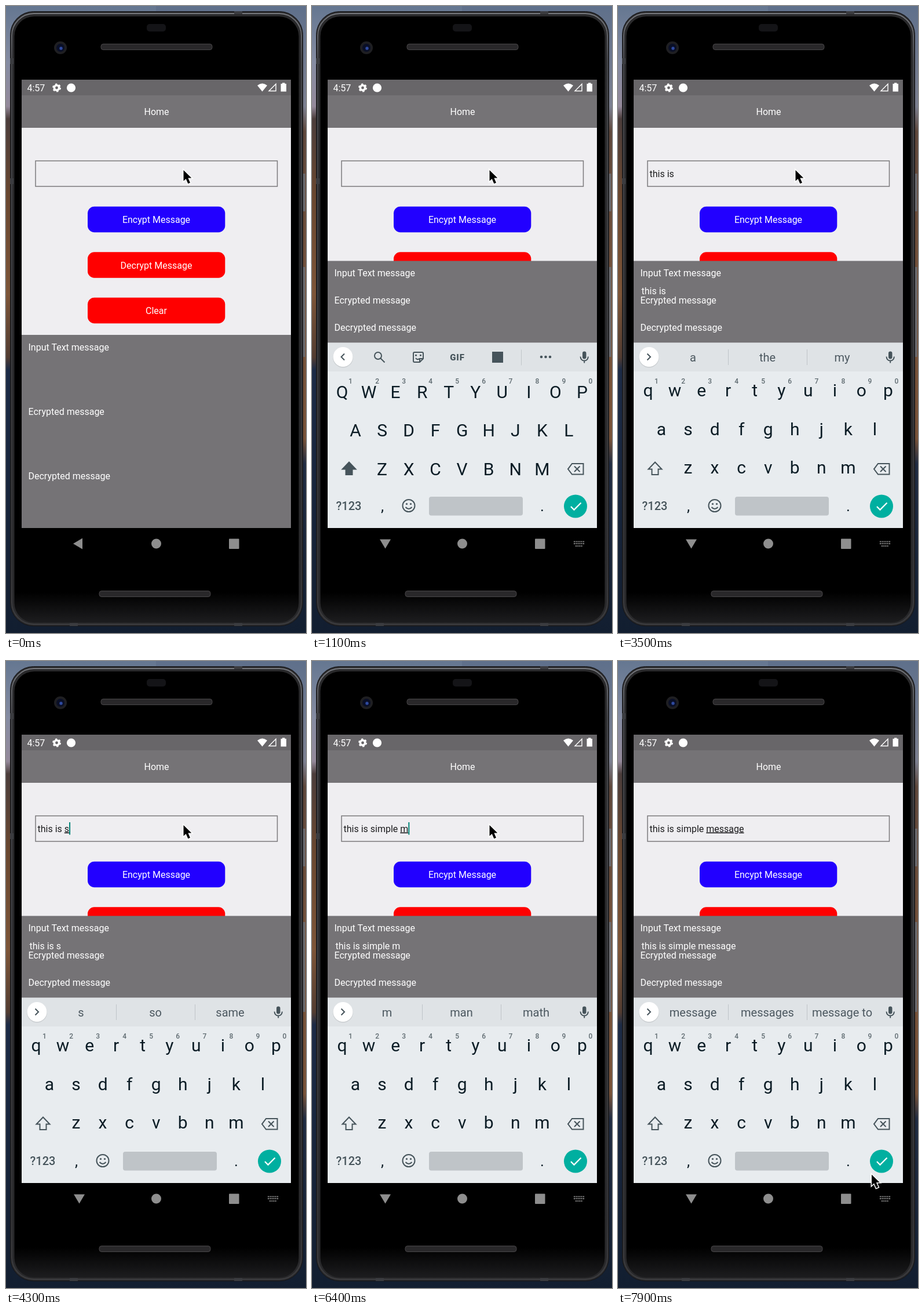
An HTML page for the animation above (8000 ms loop, 518 px wide and 1081 px high).

```html
<!DOCTYPE html>
<html lang="en">
<head>
<meta charset="utf-8">
<title>Message app</title>
<style>
html, body { margin: 0; width: 100%; height: 100%; overflow: hidden; background: #000; }
svg { display: block; width: 100vw; height: 100vh; }
text { font: 16px Roboto, sans-serif; white-space: pre; }
.mid { text-anchor: middle; }
.white { fill: #fff; }
.line { fill: none; stroke: #46545b; stroke-width: 2; }
.ink { fill: #46545b; }
.key { font-size: 30px; fill: #0b1c25; }
.hint { font-size: 12px; font-weight: 500; fill: #5e6a70; }
.word { font-size: 20px; fill: #4c5860; }
.composing { text-decoration: underline; }
</style>
</head>
<body>
<svg viewBox="0 0 518 1081" preserveAspectRatio="none">
  <defs>
    <linearGradient id="leftView" x2="0" y2="1">
      <stop offset="0" stop-color="#657791"/><stop offset=".09" stop-color="#858ca2"/>
      <stop offset=".16" stop-color="#94899a"/><stop offset=".18" stop-color="#4b3d3b"/>
      <stop offset=".3" stop-color="#694730"/><stop offset=".46" stop-color="#7d5538"/>
      <stop offset=".56" stop-color="#523c31"/><stop offset=".58" stop-color="#1c2b46"/>
      <stop offset="1" stop-color="#121e30"/>
    </linearGradient>
    <linearGradient id="rightView" x2="0" y2="1">
      <stop offset="0" stop-color="#5f708b"/><stop offset=".16" stop-color="#7b7f90"/>
      <stop offset=".2" stop-color="#5e473b"/><stop offset=".45" stop-color="#74513a"/>
      <stop offset=".69" stop-color="#785238"/><stop offset=".73" stop-color="#202c42"/>
      <stop offset="1" stop-color="#121e30"/>
    </linearGradient>
    <linearGradient id="rim" x2="0" y2="1">
      <stop offset="0" stop-color="#77797e"/><stop offset=".08" stop-color="#45464a"/>
      <stop offset=".9" stop-color="#333336"/><stop offset="1" stop-color="#3d3d40"/>
    </linearGradient>
    <linearGradient id="glass" x2="0" y2="1">
      <stop offset=".95" stop-color="#000"/><stop offset="1" stop-color="#1d1d1f"/>
    </linearGradient>
    <clipPath id="kbClip"><rect id="kbArea" x="27" y="580.5" width="465" height="319.5"/></clipPath>
  </defs>

  <rect width="518" height="1081" fill="url(#leftView)"/>
  <rect x="259" width="259" height="1081" fill="url(#rightView)"/>

  <!-- phone -->
  <path d="M512 289h4.500v65h-4.500zM512 450h4.500v155h-4.500z" fill="#6b6c71"/>
  <rect x="7.500" y="9.500" width="505" height="1059.500" rx="40" fill="#29292b" stroke="#151517"/>
  <rect x="10" y="13" width="500" height="1053" rx="38" fill="none" stroke="url(#rim)" stroke-width="2"/>
  <rect x="14.500" y="18" width="491" height="1045" rx="34" fill="url(#glass)"/>
  <path d="M7 90h6v10H7zM7 297h6v10H7zM394 9h14v5h-14zM394 1064h14v5h-14zM110 1064h14v5h-14z" fill="#3b3c40"/>
  <rect x="243" y="31" width="33" height="13" rx="5" fill="#141417"/>
  <circle cx="94" cy="72" r="11" fill="#1f1f22"/>
  <circle cx="94" cy="72" r="7" fill="#0a0f26"/>
  <circle cx="95" cy="73" r="2.700" fill="#2f4aa0"/>
  <g fill="#29282a" stroke="#484648">
    <rect x="164" y="65.500" width="192" height="10" rx="4"/>
    <rect x="161" y="1008.500" width="192" height="10" rx="4"/>
  </g>

  <!-- app -->
  <rect x="27" y="127" width="465" height="27" fill="#686669"/>
  <rect x="27" y="154" width="465" height="56" fill="#757376"/>
  <rect x="27" y="210" width="465" height="370" fill="#efeef1"/>
  <g class="white">
    <text x="36.500" y="146.500">4:57</text>
    <circle cx="87.500" cy="141" r="4.200" fill="none" stroke="#fff" stroke-width="3.600"/>
    <circle cx="87.500" cy="141" r="6.400" fill="none" stroke="#fff" stroke-width="2" stroke-dasharray="3.350 3.350"/>
    <circle cx="112.500" cy="141" r="7.600"/>
    <path d="M442.500 147.500L434 137q8.500-7 17 0z"/>
    <path d="M466 134.500V146.500H454z" fill="none" stroke="#fff" stroke-width="1.400"/>
    <path d="M474.500 134h2.500v-1.500h4.500v1.500h2.500v13.500h-9.500z"/>
    <text class="mid" x="260" y="188">Home</text>
  </g>
  <rect x="51" y="267" width="417.500" height="44" fill="none" stroke="#7b797c" stroke-width="1.500"/>
  <text x="54.500" y="294.500" fill="#1c1c1e"><tspan id="typed"></tspan><tspan id="composing" class="composing"></tspan></text>
  <rect id="caret" y="278" width="2" height="21.500" fill="#008577"/>
  <g id="buttons"></g>
  <rect id="panel" x="27" width="465" fill="#757376"/>
  <g id="labels" class="white"></g>
  <text id="echo" class="white" x="40.500" y="497"></text>

  <!-- keyboard -->
  <rect id="sheet" x="27" y="580.500" width="465" height="373.500" fill="#f8f8fa"/>
  <g clip-path="url(#kbClip)"><g id="keyboard">
    <rect x="27" y="580.500" width="465" height="374" fill="#e8ecef"/>
    <rect x="27" y="580.500" width="465" height="49.500" fill="#dfe3e6"/>
    <circle cx="53.500" cy="606" r="17.500" fill="#c9cdd0"/>
    <circle cx="53.500" cy="605" r="17" fill="#fff"/>
    <path id="chevron" class="line"/>
    <g id="tools">
      <circle class="line" cx="114" cy="603" r="6"/>
      <path class="line" d="M118.500 607.500l7 7"/>
      <path class="line" d="M177 597h13q2 0 2 2v9l-6 6h-9q-2 0-2-2v-13q0-2 2-2zM186 614v-6h6M179 607q3 4 6 1"/>
      <path class="ink" d="M178 601h3v2.500h-3zM186 601h3v2.500h-3z"/>
      <text class="mid ink" x="251" y="610.500" style="font-size:15px;font-weight:900;letter-spacing:.8px">GIF</text>
      <rect class="ink" x="311" y="596" width="19" height="19"/>
      <path d="M361.500 592.500v27" stroke="#c1c6ca"/>
      <g class="ink"><circle cx="396" cy="605" r="2.300"/><circle cx="403.500" cy="605" r="2.300"/><circle cx="411" cy="605" r="2.300"/></g>
    </g>
    <g id="words">
      <path d="M190.500 592v27M326.500 592v27" stroke="#bfc4c8"/>
    </g>
    <rect class="ink" x="467" y="595.500" width="6.500" height="13" rx="3.200"/>
    <path class="line" d="M463.500 604.500q.5 7 6.700 7t6.700-7M470.200 611v4.500"/>
    <g id="keys"></g>
    <path id="shift" class="line" d="M64 786.500l11.500 12h-6v9.500h-11v-9.500h-6z"/>
    <path class="line" d="M449 789h19.500v18.500H449l-7-9.200zM453 793.500l9.500 9.500M462.500 793.500l-9.500 9.500"/>
    <text class="mid ink" x="63.500" y="869" style="font-size:20px;font-weight:500">?123</text>
    <text class="mid key" x="121.500" y="871" style="font-size:26px">,</text>
    <text class="mid key" x="397.500" y="871" style="font-size:26px">.</text>
    <circle class="line" cx="167" cy="861.500" r="10.500"/>
    <circle class="ink" cx="163.500" cy="858.500" r="1.600"/><circle class="ink" cx="170.500" cy="858.500" r="1.600"/>
    <path class="line" d="M161.500 864q5.500 6 11 0"/>
    <rect x="202" y="846" width="162" height="32.500" rx="4" fill="#bfc4c8"/>
    <circle cx="455" cy="862.500" r="20" fill="#00afa0"/>
    <path d="M447 863l5.500 5.500 12-12" fill="none" stroke="#fff" stroke-width="2.300"/>
  </g></g>

  <!-- navigation -->
  <rect id="shade" x="27" y="900" width="465" height="54"/>
  <g id="nav">
    <path id="back" d="M116 927l16-9.500v19z"/>
    <circle cx="259.500" cy="927" r="8.500"/>
    <rect x="385" y="918.500" width="17.500" height="17.500" rx="1"/>
    <path id="kbIcon" d="M452 923.500h18M452 927h18M455 931h12" stroke-width="2" stroke-dasharray="2 1.200"/>
  </g>
  <path id="pointer" d="M0 0v18.800l4.200-3.900 3.600 8.400 3.700-1.600-3.600-8.200h5.900z" stroke="#fff" stroke-width="3" paint-order="stroke"/>
</svg>
<script>
const LOOP = 8000, STEP = 100, FOCUS = 500, RESIZE = 800;
const $ = id => document.getElementById(id);

function add(parent, tag, attrs, text = '') {
  const el = document.createElementNS('http://www.w3.org/2000/svg', tag);
  for (const name in attrs) el.setAttribute(name, attrs[name]);
  el.textContent = text;
  return parent.appendChild(el);
}
const set = (id, attrs) => { for (const name in attrs) $(id).setAttribute(name, attrs[name]); };
const show = (id, on) => set(id, { visibility: on ? 'visible' : 'hidden' });
const progress = (t, from, to) => Math.min(1, Math.max(0, (t - from) / (to - from)));
const smooth = p => p * p * (3 - 2 * p);

['Encypt Message', 'Decrypt Message', 'Clear'].forEach((label, i) => {
  const y = 345.8 + i * 78.5;
  add($('buttons'), 'rect', { x: 141, y, width: 237.3, height: 44.4, rx: 11.5, fill: i ? '#f00' : '#20f' });
  add($('buttons'), 'text', { x: 259.5, y: y + 28.5, class: 'mid white' }, label);
});

const labels = ['Input Text message', 'Ecrypted message', 'Decrypted message']
  .map(label => add($('labels'), 'text', { x: 38.5 }, label));

const keys = [];
['qwertyuiop', 'asdfghjkl', 'zxcvbnm'].forEach((row, r) => {
  [...row].forEach((letter, i) => {
    const x = [52, 75, 121][r] + i * 46.05;
    keys.push({ letter, y: 673 + r * 66.5, el: add($('keys'), 'text', { x, class: 'mid key' }) });
    if (!r) add($('keys'), 'text', { x: x + 14.5, y: 650.5, class: 'mid hint' }, (i + 1) % 10);
  });
});

const slots = [129.5, 258, 387].map(x => add($('words'), 'text', { x, y: 613, class: 'mid word' }));

// Typing: one time per letter of the message
const MESSAGE = 'this is simple message';
const TIMES = [1500, 1700, 1900, 2100, 2300, 2500, 2700, 2900, 4200, 4500, 4700, 5000,
  5300, 5600, 5900, 6300, 6500, 6700, 6800, 7000, 7200, 7300];
const HINTS = {
  t: 'the,to', th: 'the,that', thi: 'this,thing', this: 'this is,thus',
  i: "I'm,in", is: 'is a,is the', s: 'so,same', si: 'since,six', sim: 'simply,simple',
  simp: 'simply,simple', simpl: 'simple,simply', simple: 'simple and,simpler',
  m: 'man,math', me: 'me,men', mes: 'message,mess', mess: 'message,messages',
  messa: 'message,messages', messag: 'message,messages', message: 'messages,message to'
};
const NEXT = { 'this ': 'is,was,one', 'this is ': 'a,the,my', 'this is simple ': 'and,to,but' };

function drawText(t) {
  const count = TIMES.filter(time => time <= t).length;
  const text = MESSAGE.slice(0, count);
  const split = text.lastIndexOf(' ') + 1;
  const word = text.slice(split);
  $('typed').textContent = text.slice(0, split);
  $('composing').textContent = word;
  $('echo').textContent = text;

  const width = count ? $('typed').parentNode.getComputedTextLength() : 0;
  const since = t - (count ? TIMES[count - 1] : FOCUS);
  set('caret', { x: 54.5 + width });
  show('caret', since >= 0 && since % 1000 < 500);

  const offers = word ? [word, ...HINTS[word].split(',')] : (NEXT[text] || ',,').split(',');
  slots.forEach((slot, i) => slot.textContent = offers[i]);
  show('words', count > 0);
  show('tools', !count);
  set('chevron', { d: count ? 'M50.5 599.5l5.5 5.5-5.5 5.5' : 'M56 599.5l-5.5 5.5 5.5 5.5' });
  set('shift', { style: count ? '' : 'fill:#46545b' });
  for (const { letter, y, el } of keys) {
    el.textContent = count ? letter : letter.toUpperCase();
    el.setAttribute('y', count ? y : y + 2.5);
  }
}

function drawLayout(t) {
  const small = t >= RESIZE, top = small ? 439.5 : 567;
  set('panel', { y: top, height: (small ? 580.5 : 900) - top });
  labels.forEach((el, i) => el.setAttribute('y', top + 26.5 + i * (small ? 47 : 111)));
}

function drawKeyboard(t) {
  const p = progress(t, 400, 800);
  const moving = p > 0 && p < 1, open = p > 0;
  show('sheet', open);
  set('keyboard', {
    transform: `translate(0 ${160 * (1 - smooth(p))})`,
    opacity: open ? Math.min(1, p * 1.2) : 0
  });
  set('kbArea', { height: moving ? 373.5 : 319.5 });
  set('shade', { opacity: moving ? 0.56 : 1 });
  const grey = moving ? '#cacaca' : '#8e8e8e';
  set('nav', { fill: grey });
  set('kbIcon', { stroke: grey });
  show('kbIcon', open);
  set('back', { transform: `rotate(${270 * p ** 1.5} 125.5 926)` });
}

function drawPointer(t) {
  const p = smooth(progress(t, 7500, 7900));
  set('pointer', { transform: `translate(${306.5 + 131.5 * p} ${283 + 602.5 * p})` });
}

const start = performance.now();
function frame() {
  const t = Math.floor((performance.now() - start) % LOOP / STEP) * STEP;
  drawText(t);
  drawLayout(t);
  drawKeyboard(t);
  drawPointer(t);
  requestAnimationFrame(frame);
}
frame();
</script>
</body>
</html>
```
